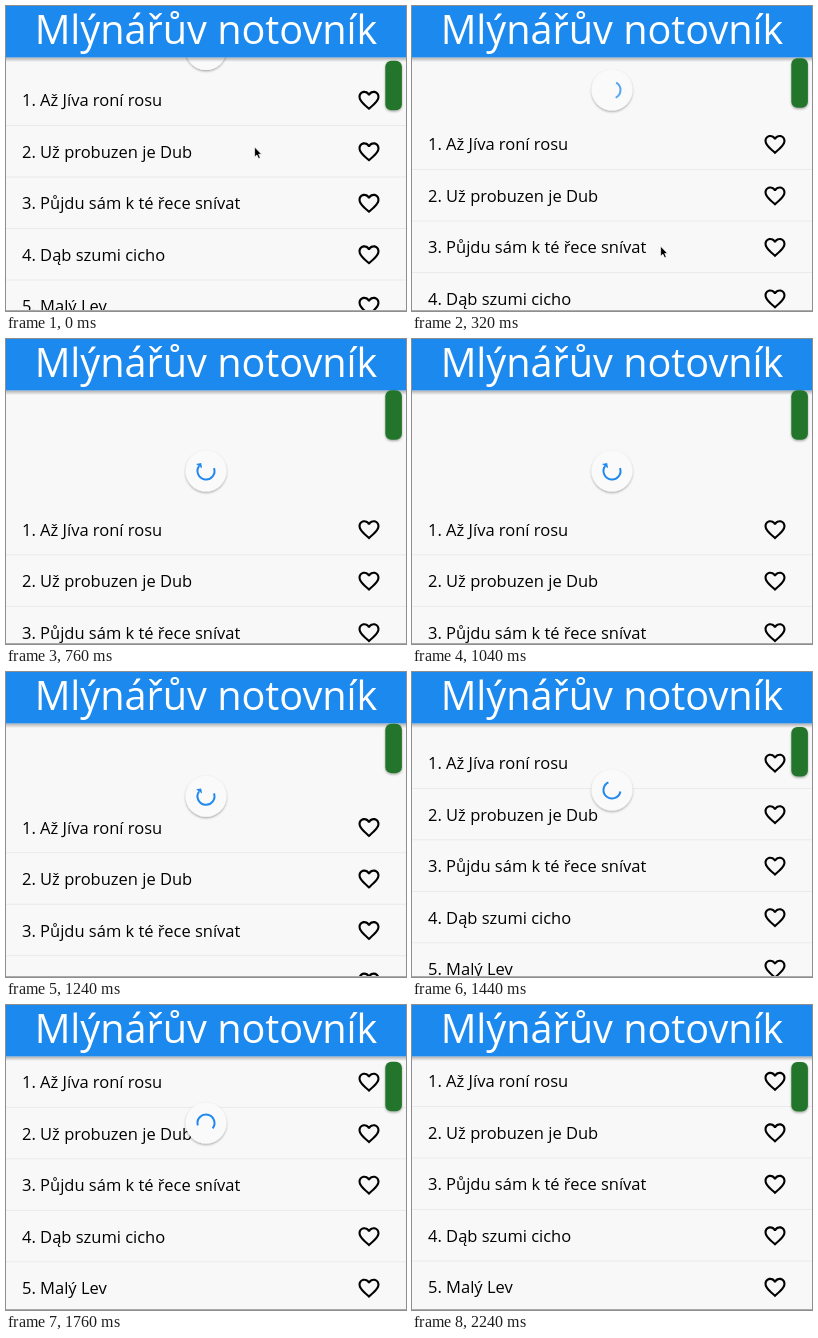
Write an HTML page that moves like this. It is 400 px wide and 305 px high and loops after 2.64 s.

```html
<!DOCTYPE html>
<html lang="cs">
<head>
<meta charset="utf-8">
<style>
  html, body { margin: 0; width: 100%; height: 100%; overflow: hidden; background: #f9f8f9; }
  svg { display: block; width: 100vw; height: 100vh; font-family: "Open Sans", "Noto Sans", sans-serif; }
</style>
</head>
<body>
<svg viewBox="0 0 400 305">
  <defs>
    <filter id="soft" x="-40%" y="-40%" width="180%" height="180%">
      <feDropShadow dx="0" dy="1.2" stdDeviation="1.3" flood-opacity=".35"/>
    </filter>
    <linearGradient id="shade" x2="0" y2="1">
      <stop stop-opacity=".3"/>
      <stop offset="1" stop-opacity="0"/>
    </linearGradient>
    <path id="heart" d="M16.5 3c-1.74 0-3.41.81-4.5 2.09C10.91 3.81 9.24 3 7.5 3 4.42 3 2 5.42 2 8.5c0 3.78 3.4 6.86 8.55 11.54L12 21.35l1.45-1.32C18.6 15.36 22 12.28 22 8.5 22 5.42 19.58 3 16.5 3zm-4.4 15.55l-.1.1-.1-.1C7.14 14.24 4 11.39 4 8.5 4 6.5 5.5 5 7.5 5c1.54 0 3.04.99 3.57 2.36h1.87C13.46 5.99 14.96 5 16.5 5c2 0 3.5 1.5 3.5 3.5 0 2.89-3.14 5.74-7.9 10.05z"/>
  </defs>
  <rect width="400" height="305" fill="#f9f8f9"/>
  <g id="list" font-size="16.5"></g>
  <g id="spinner">
    <circle r="20.5" fill="#fafafa" filter="url(#soft)"/>
    <g id="mark">
      <path id="arc" fill="none" stroke="#2189ee" stroke-width="2"/>
      <path id="arrow" fill="#2189ee"/>
    </g>
  </g>
  <rect y="51.4" width="400" height="4.6" fill="url(#shade)"/>
  <rect width="400" height="51.4" fill="#1c89ef"/>
  <text x="200" y="38.3" font-size="39.6" fill="#fff" text-anchor="middle">Mlýnářův notovník</text>
  <rect id="bar" x="379.3" width="16.6" height="49.5" rx="6" fill="#24752b" filter="url(#soft)"/>
  <rect y="304" width="400" height="1" fill="#aaa"/>
  <path id="cursor" d="M0 0V10L2.3 8 4 11.6 5.7 10.8 4.1 7.3H7Z" stroke="#fff" stroke-width=".7"/>
</svg>
<script>
const LOOP = 2640, STEP = 40;
const PULL_END = 720, RELEASE = 1158, SNAP = 150, SHRINK = 2040, SHRINK_TIME = 200;
const START = 18, REACH = 114.3, PITCH = 51.5, RADIUS = 8.5;
const songs = ['Až Jíva roní rosu', 'Už probuzen je Dub', 'Půjdu sám k té řece snívat', 'Dąb szumi cicho', 'Malý Lev'];

const $ = id => document.getElementById(id);
const clamp = v => Math.max(0, Math.min(1, v));
const mix = (a, b, k) => a + (b - a) * k;
const move = (el, x, y, scale = 1) => el.setAttribute('transform', `translate(${x} ${y}) scale(${scale})`);
const polar = (deg, r) => [r * Math.cos(deg * Math.PI / 180), r * Math.sin(deg * Math.PI / 180)];

$('list').innerHTML = songs.map((song, i) => `<g transform="translate(0 ${76.5 + i * PITCH})">
  <text x="16" y="5.8">${i + 1}. ${song}</text>
  <use href="#heart" transform="translate(350.4 -12.8) scale(1.05)"/>
  <rect y="24.5" width="400" height="1" fill="#ebe9eb"/></g>`).join('');

// Overdamped spring, the fraction of the stretch left after s seconds
const spring = s => (22 * Math.exp(-9.08 * s) - 9.08 * Math.exp(-22 * s)) / 12.92;

function drawMark(start, sweep, head) {
  const end = start + sweep;
  const large = sweep > 180 ? 1 : 0;
  $('arc').setAttribute('d', `M${polar(start, RADIUS)}A${RADIUS} ${RADIUS} 0 ${large} 1 ${polar(end, RADIUS)}`);
  const [x, y] = polar(end, RADIUS), [dx, dy] = polar(end + 90, head);
  $('arrow').setAttribute('d', `M${polar(end, RADIUS - head)}L${polar(end, RADIUS + head)}L${x + dx} ${y + dy}Z`);
}

function render(t) {
  const pull = 1 - (1 - clamp(t / PULL_END)) ** 1.04;
  const snap = clamp((t - RELEASE) / SNAP);
  const offset = t < RELEASE ? mix(START, REACH, pull) : REACH * spring((t - RELEASE) / 1000);
  move($('list'), 0, offset);
  $('bar').setAttribute('y', 57 - 5.8 * clamp(offset / 90) ** .6);
  move($('cursor'), 248.6, 141 + Math.min(t, PULL_END) * .31);

  const scale = 1 - clamp((t - SHRINK) / SHRINK_TIME);
  move($('spinner'), 200, mix(mix(43.5, 132, pull), 118, snap), scale);
  $('mark').setAttribute('opacity', clamp(.4 + pull * .75));
  if (snap < 1) drawMark(mix(-96, -20, pull), mix(30, 235, pull), 3.7 * pull * pull);
  else drawMark(10 + (t - 1440) * .48, 235, 0);
}

function tick() {
  render(Math.floor(performance.now() % LOOP / STEP) * STEP);
  requestAnimationFrame(tick);
}
tick();
</script>
</body>
</html>
```
